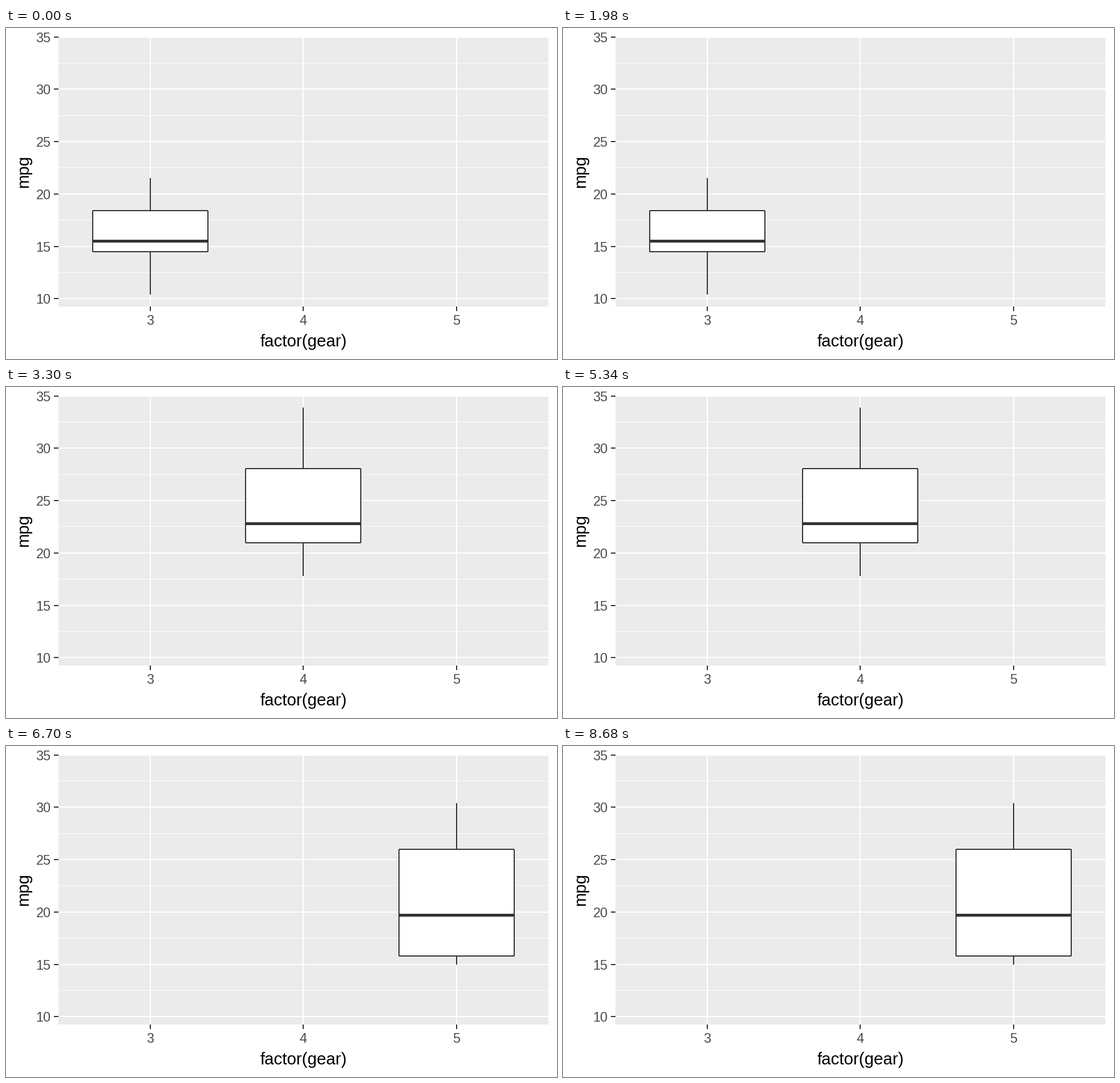
These frames come from a looping animation (966 px wide and 580 px high, 10 s). A matplotlib script:

```python
import matplotlib
import matplotlib.pyplot as plt
from matplotlib.animation import FuncAnimation
from matplotlib.patches import Rectangle

W, H, DPI = 966, 580, 100
LEFT, TOP, RIGHT, BOTTOM = 92, 15, 951, 488
INK, PANEL, LABEL = "#333333", "#EBEBEB", "#4D4D4D"
CENTERS = {3: 253, 4: 521, 5: 790}
HALF_BOX = 101

# gear: low whisker, lower hinge, median, upper hinge, high whisker
STATS = {
    3: (10.4, 14.5, 15.5, 18.4, 21.5),
    4: (17.8, 21.0, 22.8, 28.075, 33.9),
    5: (15.0, 15.8, 19.7, 26.0, 30.4),
}

matplotlib.rcParams["font.family"] = "Liberation Sans"
fig = plt.figure(figsize=(W / DPI, H / DPI), dpi=DPI, facecolor="white")
ax = fig.add_axes([0, 0, 1, 1])
ax.set_xlim(0, W)
ax.set_ylim(H, 0)
ax.axis("off")


def y_exact(mpg):
    return 474.2 - (mpg - 10) * 18.34


def y_pix(mpg):
    return round(y_exact(mpg) + 0.05)


def bar(x0, y0, x1, y1, color, z=1):
    """Fill whole pixels from (x0, y0) up to (x1, y1)."""
    patch = Rectangle((x0, y0), x1 - x0, y1 - y0, facecolor=color,
                      linewidth=0, antialiased=False, zorder=z)
    return ax.add_patch(patch)


def label(x, y, text, px, color, **kw):
    ax.text(x, y, text, fontsize=px * 72 / DPI, color=color,
            **{"ha": "center", "va": "baseline", **kw})


def draw_axes():
    bar(LEFT, TOP, RIGHT, BOTTOM, PANEL)
    for k in range(5):
        y = int(y_exact(12.5 + 5 * k))
        bar(LEFT, y, RIGHT, y + 1, "white")
    for mpg in range(10, 36, 5):
        y = y_pix(mpg)
        bar(LEFT, y - 1, RIGHT, y + 1, "white")
        bar(84, y - 1, LEFT, y + 1, INK)
        label(78.5, y + 9, str(mpg), 23.47, LABEL, ha="right")
    for gear, x in CENTERS.items():
        bar(x - 1, TOP, x + 1, BOTTOM, "white")
        bar(x - 1, BOTTOM, x + 1, 496, INK)
        label(x, 520, str(gear), 23.47, LABEL)
    label(521.5, 558, "factor(gear)", 29.33, "black")
    label(39, 251.5, "mpg", 29.33, "black", rotation=90,
          ha="right", va="center", rotation_mode="default") if False else \
        label(39, 251.5, "mpg", 29.33, "black", rotation=90,
              rotation_mode="anchor")


def draw_box(gear):
    x = CENTERS[gear]
    low, q1, mid, q3, high = (y_pix(v) for v in STATS[gear])
    x0, x1 = x - HALF_BOX, x + HALF_BOX
    parts = [
        bar(x - 1, high, x + 1, q3, INK, 3),
        bar(x - 1, q1, x + 1, low, INK, 3),
        bar(x0, q3, x1, q1, "white", 4),
    ]
    parts += [bar(x0, y - 1, x1, y + 1, INK, 5) for y in (q3, q1)]
    parts += [bar(e - 1, q3, e + 1, q1, INK, 5) for e in (x0, x1)]
    parts.append(bar(x0, mid - 2, x1, mid + 3, INK, 5))
    return parts


draw_axes()
boxes = {gear: draw_box(gear) for gear in STATS}


def update(i):
    shown = 3 if i < 33 else 4 if i < 67 else 5
    for gear, parts in boxes.items():
        for part in parts:
            part.set_visible(gear == shown)
    return [part for parts in boxes.values() for part in parts]


anim = FuncAnimation(fig, update, frames=100, interval=100, repeat=True,
                     repeat_delay=0, blit=False)
plt.show()
```
